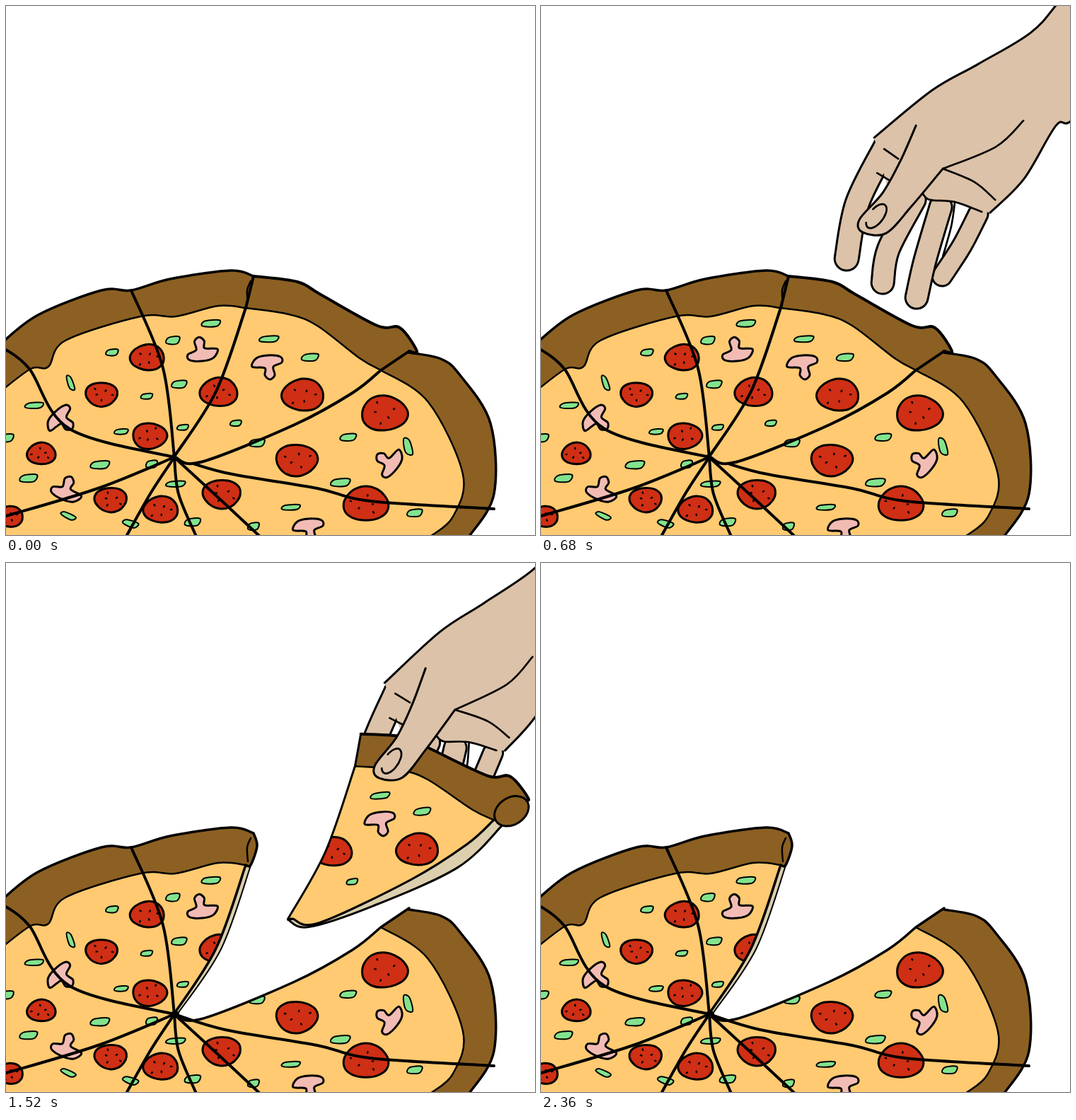
An HTML page with a canvas that plays this animation: 748x748 px, repeating every 2.4 s.

```html
<!DOCTYPE html>
<html lang="en">
<head>
<meta charset="utf-8">
<title>Taking a slice</title>
<style>
  html, body { margin: 0; width: 100%; height: 100%; overflow: hidden; background: #fff; }
  canvas { display: block; width: 748px; height: 748px; }
</style>
</head>
<body>
<canvas id="stage" width="748" height="748"></canvas>
<script>
const ctx = document.getElementById('stage').getContext('2d');
ctx.lineJoin = ctx.lineCap = 'round';

const BROWN = '#8c6022', CHEESE = '#ffca71', RED = '#cf2f14', GREEN = '#83e38d';
const PINK = '#f2bcb5', SKIN = '#dcc2a8', DOUGH = '#dccfae', INK = '#000';

const parse = s => s.split(' ').map(p => p.split(',').map(Number));

// Smooth curve through every point
function smooth(path, p, closed) {
  const n = p.length;
  const at = i => closed ? p[(i + n) % n] : p[Math.max(0, Math.min(n - 1, i))];
  for (let i = 0; i < (closed ? n : n - 1); i++) {
    const [a, b, c, d] = [at(i - 1), at(i), at(i + 1), at(i + 2)];
    path.bezierCurveTo(b[0] + (c[0] - a[0]) / 6, b[1] + (c[1] - a[1]) / 6,
      c[0] - (d[0] - b[0]) / 6, c[1] - (d[1] - b[1]) / 6, c[0], c[1]);
  }
}

// Smooth sections joined at sharp corners
function shape(...sections) {
  const path = new Path2D();
  sections.map(parse).forEach((p, i) => {
    path[i ? 'lineTo' : 'moveTo'](...p[0]);
    smooth(path, p, false);
  });
  return path;
}

function blob(points) {
  const path = new Path2D();
  path.moveTo(...points[0]);
  smooth(path, points, true);
  path.closePath();
  return path;
}

function oval(x, y, rx, ry, tilt, from = 0, to = 2 * Math.PI) {
  const path = new Path2D();
  path.ellipse(x, y, rx, ry, tilt, from, to);
  return path;
}

function fill(path, color) { ctx.fillStyle = color; ctx.fill(path); }
function line(path, width = 3, color = INK) { ctx.strokeStyle = color; ctx.lineWidth = width; ctx.stroke(path); }
function paint(path, color, width) { fill(path, color); line(path, width); }

// Pizza edges, through a few key points each
const outerLeft = '-9,479 45,437 135,402 177,402 232,386 318,374 350,382';
const outerSlice = '570,488 581,488 557,455 525,452 445,408 412,390 350,382';
const outerRight = '570,490 615,499 642,522 685,590 690,690 655,750';
const rimLeft = '-9,546 35,513 60,510 84,473 190,439 240,439 300,424 339,427';
const rimSlice = '530,515 500,498 440,452 400,436 339,427';
const rimRight = '530,515 597,560 646,662 632,722 600,750';
const crustCutLeft = '350,382 339,427';
const crustCutRight = '530,515 570,488';
const cutLeft = '339,427 297,545 238,637';
const bentLeft = '339,427 290,545 231,637';
const cutRight = '238,637 275,645 408,592 490,547 530,515';

const baseCrust = shape(outerLeft, '350,382 355,400 346,427 339,427', cutLeft, cutRight, crustCutRight, outerRight, '655,760 -10,760');
const baseCheese = shape(rimLeft, cutLeft, cutRight, rimRight, '600,760 -10,760');
const baseSide = shape(cutLeft, '243,637 304,546 346,428');
const sliceSide = shape('541,524 475,579 352,626 260,650 231,638', cutRight);
const sliceEnd = oval(556, 504, 26, 19, -.5);
const cuts = [
  '177,402 222,512 238,638', '-3,484 33,513 90,598 238,638', '-3,722 130,682 238,638',
  '170,750 205,688 238,638', '269,750 244,690 238,638', '359,750 300,695 240,640',
  '238,638 310,660 440,682 515,700 690,711'
].map(s => shape(s));

// Toppings: x, y and an optional tilt
const basePepperoni = parse('200,497 135,549 203,608 50,633 148,698 219,712 5,722 535,576 411,642 305,690 509,704');
const slicePepperoni = parse('301,546 420,550');
const baseLeaves = parse('150,490 236,473 290,449 91,533,1.3 40,565 199,552 163,602 245,535 250,596 133,649 206,648 32,668 ' +
  '88,721,.5 176,732,.4 240,676 264,730 350,736 403,709 473,674 484,610 568,623,1.4 578,717 0,611');
const sliceLeaves = parse('372,471 430,497 325,590');
const sharedLeaf = [355, 618];
const baseMushrooms = parse('277,488,3.1 78,585,-.7 86,685,3.6 542,645,2.3 428,739,0');
const sliceMushroom = [370, 508, 0];

const mushroomShape = blob(parse('-22,2 -16,-10 0,-14 18,-12 20,-4 8,2 10,14 3,20 -4,14 -4,4'));

// Slices nearer the right carry bigger pepperoni
function pepperoni([x, y]) {
  const w = 19 + x / 40, h = w * .76;
  const edge = Array.from({ length: 12 }, (_, i) => {
    const a = i * Math.PI / 6, r = 1 + .04 * Math.sin(3 * a + x);
    return [x + w * r * Math.cos(a), y + h * r * Math.sin(a)];
  });
  paint(blob(edge), RED, 3);
  for (let i = 0; i < 5; i++) {
    const a = i * 2.4 + x, r = .3 + .1 * i;
    fill(oval(x + w * r * Math.cos(a), y + h * r * Math.sin(a), 2, 1.3, a), INK);
  }
}

function leaf([x, y, tilt = 0]) {
  const w = 11 + 3 * Math.sin(x), h = 5 + Math.sin(y);
  const c = Math.cos(tilt), s = Math.sin(tilt);
  const edge = [[-1, .5], [-.6, -.7], [.9, -.9], [.7, .6], [-.2, .9]]
    .map(([u, v]) => [x + u * w * c - v * h * s, y + u * w * s + v * h * c]);
  paint(blob(edge), GREEN, 2);
}

function mushroom([x, y, tilt]) {
  ctx.save();
  ctx.translate(x, y);
  ctx.rotate(tilt);
  paint(mushroomShape, PINK, 3);
  ctx.restore();
}

function within(area, draw) {
  ctx.save();
  ctx.clip(area);
  draw();
  ctx.restore();
}

function drawBase() {
  paint(baseSide, DOUGH, 2);
  fill(baseCrust, BROWN);
  fill(baseCheese, CHEESE);
  within(baseCheese, () => {
    [...baseLeaves, sharedLeaf].forEach(leaf);
    [...basePepperoni, slicePepperoni[0]].forEach(pepperoni);
    baseMushrooms.forEach(mushroom);
  });
  line(shape(rimLeft), 2.5);
  line(shape(rimRight), 2.5);
  line(baseCrust, 3.5);
  line(shape('346,389 341,402 342,422'), 2.5);
  cuts.forEach(c => line(c, 4));
  fill(oval(239, 638, 6, 5, 0), INK);
}

function drawSlice(lifted) {
  const left = lifted ? bentLeft : cutLeft;
  const cheese = shape(left, cutRight, rimSlice);
  if (lifted) paint(sliceSide, DOUGH, 3);
  fill(shape(crustCutLeft, left, cutRight, crustCutRight, outerSlice), BROWN);
  fill(cheese, CHEESE);
  within(cheese, () => {
    sliceLeaves.forEach(leaf);
    if (!lifted) leaf(sharedLeaf);
    slicePepperoni.forEach(pepperoni);
    mushroom(sliceMushroom);
  });
  line(shape(rimSlice), 2.5);
  line(shape(crustCutLeft, left, cutRight), lifted ? 3 : 4);
  line(shape(outerSlice), 4);
  if (lifted) paint(sliceEnd, BROWN, 3);
  else line(shape(crustCutRight), 3.5);
}

// Hand
const armTop = '790,-45 748,4 655,113 610,163 535,208 470,245 388,312';
const armBottom = '552,418 600,370 645,295 670,285 748,193 790,143';
const knuckles = '457,392 467,400 502,403 540,417';
const palm = shape(armTop, '388,312 410,395', knuckles, armBottom);
const fingers = [
  ['535,420 512,465 484,508', 28], ['482,410 460,485 448,538', 32],
  ['445,400 408,470 400,517', 32], ['404,325 364,405 349,483', 34]
].map(([s, width]) => [shape(s), width]);
const creases = ['402,328 422,342', '392,362 409,372', '485,356 530,375 559,400', knuckles,
  '502,403 497,437 485,480', '485,356 560,325 599,288'].map(s => shape(s));
const thumb = shape('447,295 425,345 400,390 367,428 372,446 405,447 440,410 485,356');
const nail = oval(391, 423, 10, 20, .65, -2.9, 2.2);

function drawHand() {
  for (const [finger, width] of fingers) {
    line(finger, width + 3);
    line(finger, width - 3, SKIN);
  }
  fill(palm, SKIN);
  line(shape(armTop));
  line(shape(armBottom));
  creases.forEach(c => line(c, 2.7));
}

function drawThumb() {
  paint(thumb, SKIN, 3);
  line(nail, 2.7);
}

// Movement: [time, x, y, degrees]
const LOOP = 2400, STEP = 40, LIFT = 1040;
const REST = [0, 0, 0, 0];
const keys = [
  [0, 366, -554, 0], [880, 0, 0, 0], [LIFT, 0, 0, 0], [1240, 51, -30, -3.5],
  [1520, 154, -143, -3.5], [1760, 265, -257, -3.5], [LOOP, 528, -522, -3.5]
];

function poseAt(t) {
  const i = keys.findIndex(k => k[0] > t), a = keys[i - 1], b = keys[i];
  const f = (t - a[0]) / (b[0] - a[0]);
  return a.map((v, n) => v + (b[n] - v) * f);
}

function posed([, x, y, degrees], draw) {
  ctx.save();
  ctx.translate(392 + x, 420 + y);
  ctx.rotate(degrees * Math.PI / 180);
  ctx.translate(-392, -420);
  draw();
  ctx.restore();
}

function frame() {
  const t = Math.floor(performance.now() % LOOP / STEP) * STEP;
  const pose = poseAt(t), lifted = t > LIFT;
  const slice = () => posed(lifted ? pose : REST, () => drawSlice(lifted));
  ctx.fillStyle = '#fff';
  ctx.fillRect(0, 0, 748, 748);
  posed(pose, drawHand);
  // The lifted slice slides out from behind its neighbour
  (lifted ? [slice, drawBase] : [drawBase, slice]).forEach(draw => draw());
  posed(pose, drawThumb);
  requestAnimationFrame(frame);
}
frame();
</script>
</body>
</html>
```
